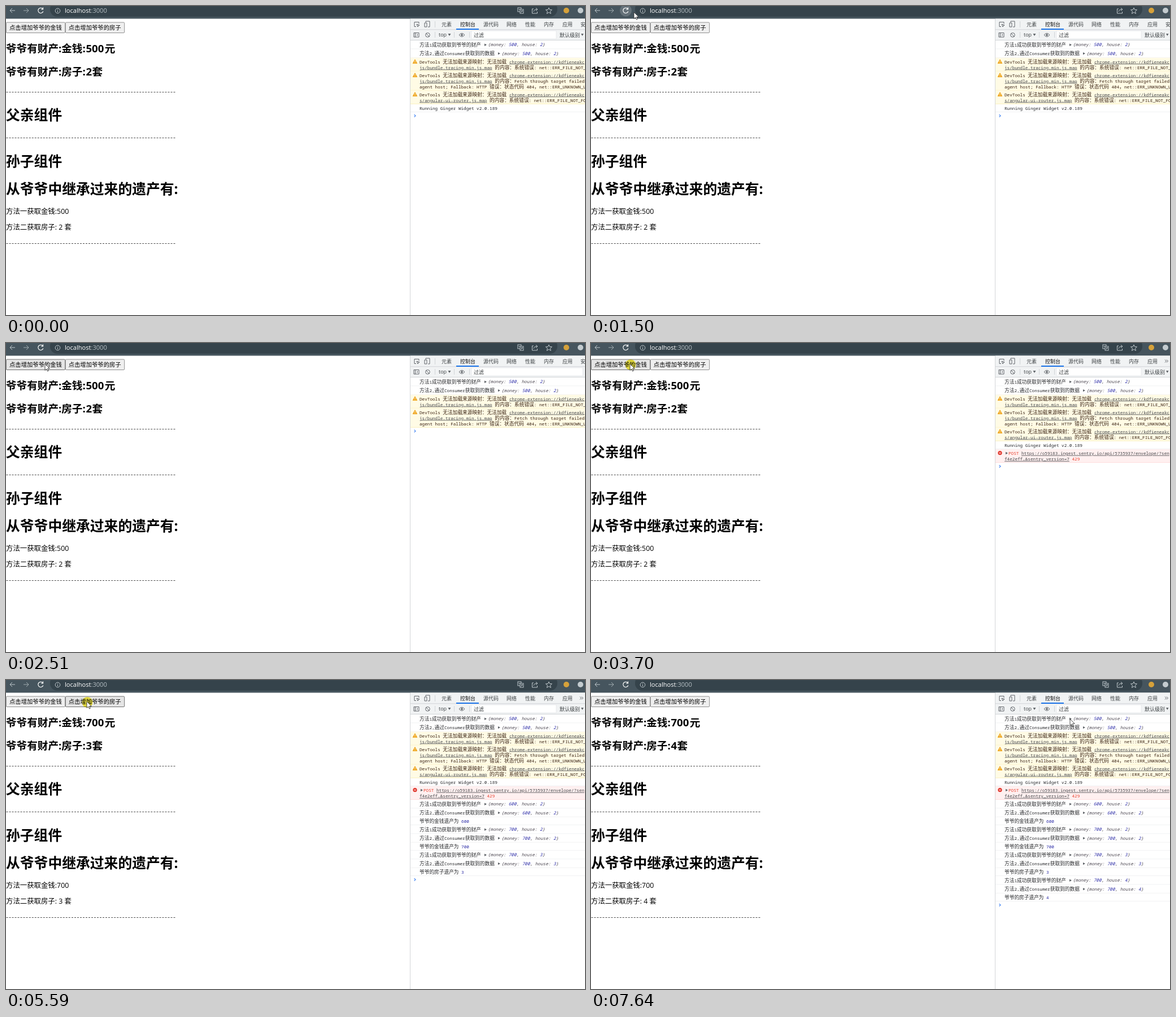
These frames come from a looping animation (1025 by 547 pixels, 8000 ms). An HTML page:

```html
<!DOCTYPE html>
<html lang="zh-CN">
<head>
<meta charset="utf-8">
<title>localhost:3000</title>
<style>
html, body { margin: 0; width: 100%; height: 100%; overflow: hidden; background: #fff; }
svg { display: block; width: 100%; height: 100%; }
text { font-family: "Open Sans", "Noto Sans CJK SC", "Noto Sans CJK", sans-serif; white-space: pre; }
.h1 { font-size: 24.8px; font-weight: 700; }
.h2 { font-size: 18.6px; font-weight: 700; }
.p { font-size: 12.4px; }
.rule { font-size: 12.4px; letter-spacing: 1.03px; fill: #444; }
.label { font-size: 10.33px; }
.url { font-size: 11.1px; fill: #fff; }
.tab { font-size: 9px; fill: #3c4043; }
.tab.active { fill: #111; }
.button { fill: #efefef; stroke: #767676; stroke-width: .8; }
.button.hover { fill: #e5e5e5; stroke: #4f4f4f; }
.icon { fill: none; stroke: #cdd5d9; stroke-width: .9; }
.tool { fill: none; stroke: #5f6368; stroke-width: 1; }
.split { stroke: #c9ccd0; stroke-width: .8; }
#console text { font-family: "Noto Sans Mono", "Noto Sans CJK SC", "Noto Sans CJK", monospace; font-size: 7.67px; fill: #26272a; }
#console .cjk { font-family: "Noto Sans CJK SC", "Noto Sans CJK", sans-serif; font-size: 8.7px; }
#console .warn { fill: #3a2313; }
#console .link { fill: #45474b; text-decoration: underline; }
#console .error { fill: #e8402f; }
#console .number { fill: #2b2ba6; }
#console .object { font-style: italic; fill: #4b4650; }
.travel { animation: travel 8s infinite step-end; }
#glow { mix-blend-mode: multiply; }
@keyframes travel {
  0% { transform: translate(1040px, 560px); }
  3.125% { transform: translate(955px, 533px); animation-timing-function: steps(4); }
  6.625% { transform: translate(560px, 270px); animation-timing-function: steps(4); }
  10.125% { transform: translate(180px, 62px); animation-timing-function: steps(3); }
  12.75% { transform: translate(86px, 17px); animation-timing-function: steps(3); }
  15.375% { transform: translate(61px, 9px); }
  17.75% { transform: translate(66px, 9px); }
  18.75% { transform: translate(76px, 11px); animation-timing-function: steps(5); }
  22.875% { transform: translate(83px, 20px); animation-timing-function: steps(6); }
  28% { transform: translate(69px, 37px); }
  57.1% { transform: translate(69px, 37px); animation-timing-function: steps(7); }
  63% { transform: translate(143px, 38px); }
  78.125% { transform: translate(152px, 44px); animation-timing-function: steps(4); }
  81.6% { transform: translate(390px, 108px); animation-timing-function: steps(5); }
  85.8% { transform: translate(740px, 90px); animation-timing-function: steps(2); }
  87.75% { transform: translate(827px, 72px); animation-timing-function: steps(4); }
  91.25% { transform: translate(852px, 69px); }
  94.625% { transform: translate(850px, 69px); }
  95.5%, 100% { transform: translate(848px, 69px); }
}
</style>
</head>
<body>
<svg viewBox="0 0 1025 547">
  <rect width="1025" height="547" fill="#fff"/>

  <g id="browser">
    <rect width="1025" height="22.500" fill="#46555e"/>
    <rect x="78" y="-8" width="898" height="27" rx="13" fill="#35434b"/>
    <circle id="reloadHover" cx="61.500" cy="8" r="10.500" fill="#fff" opacity=".17"/>
    <path class="icon" d="M16 8H7M11 4L7 8l4 4"/>
    <path class="icon" d="M31 8h9M36 4l4 4-4 4" opacity=".75"/>
    <path class="icon" style="stroke:#fff;stroke-width:1.2" d="M65 5A4.600 4.600 0 1 0 65.800 9.500M65.500 2.500V6H62"/>
    <circle class="icon" cx="91.500" cy="8.500" r="4.300"/>
    <path class="icon" d="M91.500 8v3M91.500 6v1"/>
    <text class="url" x="104" y="12">localhost<tspan fill="#b5bec3">:3000</tspan></text>
    <g id="translate" class="icon">
      <rect x="906" y="3" width="6" height="7"/>
      <rect x="910" y="6" width="6" height="7" fill="#35434b"/>
      <path d="M911.500 8.500h3.500M911.500 11.500l3-3M907.500 6h2.500"/>
    </g>
    <path class="icon" d="M934 5h-2.500v8h9v-3M934 10c.5-3 3-4 6-4M938 3.500l3 2.500-3 2.500"/>
    <path class="icon" d="M961 3l1.500 3.500 4 .3-3 2.700 1 4-3.500-2.200-3.500 2.200 1-4-3-2.700 4-.3z"/>
    <circle cx="992" cy="8" r="5" fill="#d6a13a"/>
    <circle cx="1017" cy="8" r="5" fill="#c3cbcf"/>
  </g>

  <g id="page">
    <rect id="moneyButton" class="button" x=".4" y="29" width="104.300" height="18.500" rx="1.500"/>
    <rect id="houseButton" class="button" x="105.400" y="29" width="104.300" height="18.500" rx="1.500"/>
    <text class="label" x="6" y="42.200">点击增加爷爷的金钱</text>
    <text class="label" x="110.700" y="42.200">点击增加爷爷的房子</text>
    <text class="h2" x="0" y="82.300">爷爷有财产:金钱:</text>
    <text class="h2 money" x="141.500" y="82.300"></text>
    <text class="h2" x="174.800" y="82.300">元</text>
    <text class="h2" x="0" y="122.800">爷爷有财产:房子:</text>
    <text class="h2 house" x="141.500" y="122.800"></text>
    <text class="h2" x="152.500" y="122.800">套</text>
    <text class="h1" x="0" y="202.400">父亲组件</text>
    <text class="h1" x="0" y="284.300">孙子组件</text>
    <text class="h1" x="0" y="332.500">从爷爷中继承过来的遗产有:</text>
    <text class="p" x="0" y="367.800">方法一获取金钱:<tspan class="money"></tspan></text>
    <text class="p" x="0" y="396.300">方法二获取房子: <tspan class="house"></tspan> 套</text>
  </g>

  <g id="devtools">
    <rect x="716" y="22.500" width="309" height="38" fill="#f1f3f4"/>
    <path class="split" d="M715.500 23V547M716 41.800H1025M716 60.500H1025M759.500 27V38M759.500 46V56M793.500 46V56M820.500 46V56"/>
    <rect x="797" y="40" width="40" height="2" fill="#1a73e8"/>
    <path class="tool" d="M726 36.500h-3v-8h8v3M727 32l5 2-2 1-1 2zM743 29V27h7v10h-3M741 30h4v7h-4z"/>
    <path class="tool" d="M722 47.500h9v7.500h-9zM724.500 47.500v7.500M727 49.500l2 1.700-2 1.700"/>
    <circle class="tool" cx="746.500" cy="51.300" r="3.800"/>
    <path class="tool" d="M744 48.600l5 5.400M802 51.300q5-6 10 0q-5 6-10 0z"/>
    <circle cx="807" cy="51.300" r="1.700" fill="#5f6368"/>
    <text class="tab" x="766" y="54.300">top</text>
    <path d="M782.500 49h5l-2.500 4z" fill="#5f6368"/>
    <rect id="filter" x="824" y="44" height="14" fill="#fff" stroke="#dcdfe3" stroke-width=".6"/>
    <text class="tab" x="828" y="54.500">过滤</text>
    <g id="levels">
      <text class="tab" x="980" y="54.500">默认级别</text>
      <path d="M1018 49h4.500l-2.200 4z" fill="#5f6368"/>
    </g>
    <text id="lastTab" class="tab" x="1017" y="36">安</text>
    <path id="moreTabs" class="tool" d="M1016 29.500l2.500 2.500-2.500 2.500M1019 29.500l2.500 2.500-2.500 2.500"/>
  </g>

  <g id="console"></g>

  <g id="glow" class="travel"><circle cx="1" cy="1.500" r="9.500" fill="#f6ec45"/></g>
  <path class="travel" d="M0 0V11.500L2.700 9L4.500 13L6.300 12.200L4.500 8.300H8.200Z" fill="#fff" stroke="#222" stroke-width=".8"/>
</svg>
<script>
const LOOP = 8000;
const $ = id => document.getElementById(id);
const panel = $('console');

function add(parent, tag, attrs = {}, content = '') {
  const node = document.createElementNS('http://www.w3.org/2000/svg', tag);
  for (const key in attrs) node.setAttribute(key, attrs[key]);
  node.textContent = content;
  return parent.appendChild(node);
}

// Chinese runs are set slightly larger than the monospace around them.
function appendRuns(parent, content) {
  content.split(/([\u2e80-\uffef]+)/).forEach((run, i) => {
    if (run) add(parent, 'tspan', i % 2 ? { class: 'cjk' } : {}, run);
  });
}

function line(row, x, middle, cls, ...parts) {
  const text = add(row, 'text', { x, y: middle + 2.9, class: cls });
  for (const part of parts) {
    const [content, style] = [].concat(part);
    appendRuns(style ? add(text, 'tspan', { class: style }) : text, content);
  }
}

const arrow = (row, x, y) => add(row, 'path', { d: `M${x} ${y - 2.2}l4 2.200-4 2.200z`, fill: '#5f6368' });

function state(label, objectX) {
  return (money, house) => ({ height: 15.3, draw(row, y) {
    line(row, 732, y + 7.8, '', label);
    arrow(row, objectX - 6, y + 7.8);
    line(row, objectX, y + 7.5, 'object', '{money: ', [`${money}`, 'number'], ', house: ', [`${house}`, 'number'], '}');
  } });
}
const first = state('方法1成功获取到爷爷的财产', 853);
const second = state('方法2,通过Consumer获取到的数据', 877);

const total = (name, value) => ({ height: 14.4, draw(row, y) {
  line(row, 732, y + 7, '', `爷爷的${name}遗产为 `, [`${value}`, 'number']);
} });

const warning = (file, reason, extra) => ({ height: extra ? 34 : 24, fill: '#fffbe5', edge: '#fbeeb5', draw(row, y) {
  add(row, 'path', { d: `M724 ${y + 3.2}l3.700 6.800h-7.400z`, fill: '#efa51c', stroke: '#efa51c', 'stroke-linejoin': 'round' });
  add(row, 'path', { d: `M724 ${y + 5.2}v2.400m0 .8v1`, stroke: '#fff', 'stroke-width': .9 });
  line(row, 732, y + 7, 'warn', 'DevTools 无法加载来源映射：无法加载 ', ['chrome-extension://kdfieneakc', 'link']);
  line(row, 732, y + 17, 'warn', [file, 'link'], ` 的内容：${reason}`);
  if (extra) line(row, 732, y + 27, 'warn', extra);
} });

const plain = content => ({ height: 14.4, draw: (row, y) => line(row, 732, y + 7, '', content) });

const failure = { height: 24, fill: '#fff0f0', edge: '#ffd9d9', draw(row, y) {
  add(row, 'circle', { cx: 724, cy: y + 6.7, r: 3.6, fill: '#e0362c' });
  add(row, 'path', { d: `M722.600 ${y + 5.3}l2.800 2.800m0-2.800l-2.800 2.800`, stroke: '#fff', 'stroke-width': .9 });
  arrow(row, 734, y + 7);
  line(row, 739, y + 7, 'error', 'POST ', ['https://o59183.ingest.sentry.io/api/5735937/envelope/?sen', 'link']);
  line(row, 732, y + 17, 'error', ['f4e2eff…&sentry_version=7', 'link'], ' 429');
} };

const update = (money, house, name, value) => [first(money, house), second(money, house), total(name, value)];

const entries = [
  first(500, 2), second(500, 2),
  warning('js/bundle.tracing.min.js.map', '系统错误: net::ERR_FILE_NOT_'),
  warning('js/bundle.tracing.min.js.map', 'Fetch through target failed',
    'agent host; Fallback: HTTP 错误：状态代码 404，net::ERR_UNKNOWN_U'),
  warning('s/angular-ui-router.js.map', '系统错误: net::ERR_FILE_NOT_FO'),
  plain('Running Ginger Widget v2.0.189'),
  failure,
  ...update(600, 2, '金钱', 600), ...update(700, 2, '金钱', 700),
  ...update(700, 3, '房子', 3), ...update(700, 4, '房子', 4)
];

const tops = [61];
const rows = entries.map((entry, i) => {
  const y = tops[i], row = add(panel, 'g');
  tops.push(y + entry.height);
  if (entry.fill) add(row, 'rect', { x: 716, y, width: 309, height: entry.height, fill: entry.fill });
  add(row, 'rect', { x: 716, y: y + entry.height - .8, width: 309, height: .8, fill: entry.edge || '#eeeff1' });
  entry.draw(row, y);
  return row;
});
const prompt = add(panel, 'path', { d: 'M722.700-2.200l2.300 2.200-2.300 2.200', fill: 'none', stroke: '#367cf1', 'stroke-width': 1.1 });

for (const y of [155.5, 236.5, 423.5]) add($('page'), 'text', { x: 0, y, class: 'rule' }, '-'.repeat(60));
[['元素', 771], ['控制台', 804], ['源代码', 845], ['网络', 886], ['性能', 919], ['内存', 952], ['应用', 985]]
  .forEach(([name, x]) => add($('devtools'), 'text', { x, y: 36, class: name === '控制台' ? 'tab active' : 'tab' }, name));

// Time, visible console rows, money, houses.
const steps = [
  [0, 6, 500, 2], [1630, 0, 500, 2], [1970, 2, 500, 2], [2170, 3, 500, 2], [2510, 4, 500, 2],
  [2570, 6, 500, 2], [2700, 7, 500, 2], [3830, 9, 600, 2], [3900, 10, 600, 2], [4370, 11, 700, 2],
  [4500, 13, 700, 2], [5180, 16, 700, 3], [5720, 18, 700, 4], [5790, 19, 700, 4]
];
const clicks = [[1230, 1360], [3700, 3830], [4300, 4370], [5110, 5180], [5590, 5720]];

const show = (node, visible) => { node.style.display = visible ? '' : 'none'; };
const fill = (cls, value) => document.querySelectorAll('.' + cls).forEach(node => { node.textContent = value; });

function render(t) {
  const within = (from, to) => t >= from && t < to;
  const [, count, money, house] = steps.findLast(step => step[0] <= t);
  rows.forEach((row, i) => show(row, i < count));
  prompt.setAttribute('transform', `translate(0 ${tops[count] + 6.3})`);
  fill('money', money);
  fill('house', house);
  $('glow').style.opacity = clicks.some(([from, to]) => within(from, to)) ? 1 : 0;
  show($('reloadHover'), within(1160, 1560));
  show($('translate'), !within(1300, 2040));
  const narrow = !within(2240, 2640);
  show($('levels'), narrow);
  $('filter').setAttribute('width', narrow ? 150 : 197);
  show($('lastTab'), t < 2640);
  show($('moreTabs'), t >= 2640);
  $('moneyButton').classList.toggle('hover', within(2170, 4840));
  $('houseButton').classList.toggle('hover', within(4840, 6320));
}

let start;
function tick(now) {
  start ??= now;
  render((now - start) % LOOP);
  requestAnimationFrame(tick);
}
render(0);
requestAnimationFrame(tick);
</script>
</body>
</html>
```
